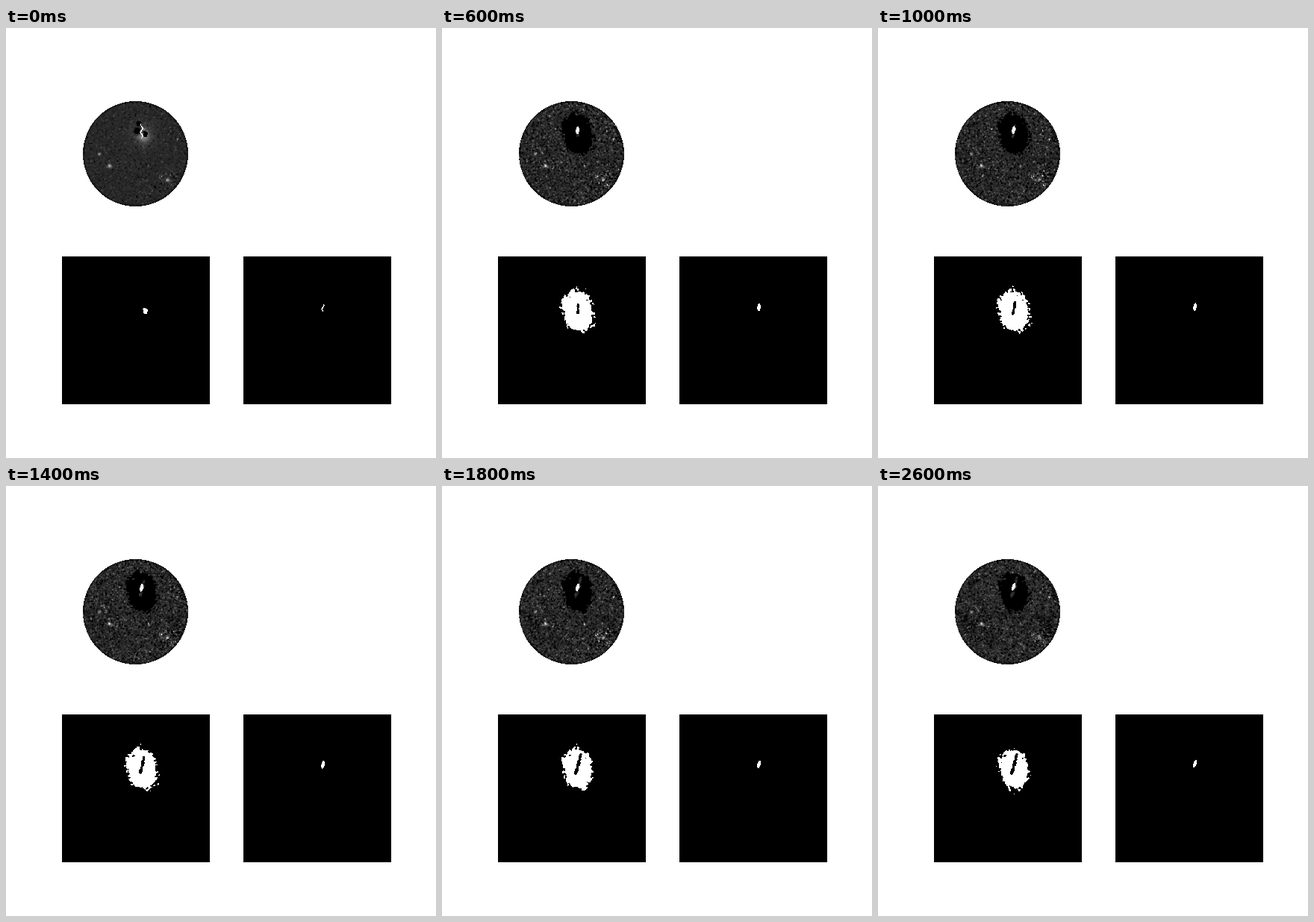
These frames come from a looping animation (576x576 px, 2800 ms). A matplotlib script:

```python
import numpy as np
import matplotlib.pyplot as plt
from matplotlib.animation import FuncAnimation

STAGE, PANEL, FRAMES = 576, 198, 14
axis = np.arange(PANEL) + 0.5
X, Y = np.meshgrid(axis, axis)
RADIUS = np.hypot(X - 98.5, Y - 99.5)


def noise(seed, passes=1):
    """Seeded grain; more passes make larger clumps."""
    n = np.random.default_rng(seed).standard_normal(X.shape)
    for _ in range(passes):
        for side in (0, 1):
            n = n + 0.35 * (np.roll(n, 1, side) + np.roll(n, -1, side))
    return n / n.std()


def glow(x, y, sigma):
    return np.exp(-((X - x) ** 2 + (Y - y) ** 2) / (2 * sigma ** 2))


def stroke(ax, ay, bx, by, width):
    """Signed distance to a thick line, positive inside."""
    dx, dy = bx - ax, by - ay
    t = np.clip(((X - ax) * dx + (Y - ay) * dy) / (dx * dx + dy * dy), 0, 1)
    return width - np.hypot(X - ax - t * dx, Y - ay - t * dy)


GRAIN, EDGE, PATCH = noise(3), noise(5, 3), noise(8, 12)
ACTIVE = 1 + 0.6 * glow(142, 134, 9) + 0.5 * glow(159, 72, 9)


def timing(k):
    """Progress through the loop and the fading onset of the eruption."""
    return k / (FRAMES - 1), np.exp(-2 * k)


def filament(k, half_height):
    """Narrow bright column that first wriggles, then leans over."""
    p, onset = timing(k)
    rise = 68.7 - 2.7 * p - Y
    centre = 106.6 + 0.3 * p * rise + 1.3 * onset * np.sin(0.6 * Y)
    width = (2.2 - 1.3 * onset) * np.sqrt(np.clip(1 - (rise / half_height) ** 2, 0, 1))
    return np.abs(X - centre) < width


def dimming(k):
    """Signed depth of the dark region: a tilted oval split by a slit."""
    p, onset = timing(k)
    size = 1 - 0.85 * onset - 0.09 * p
    tilt = np.radians(16)
    x, y = X - 107.5 - 3.5 * onset, Y - 73
    across = x * np.cos(tilt) - y * np.sin(tilt)
    along = x * np.sin(tilt) + y * np.cos(tilt)
    depth = 20 * (size - np.hypot(across / 21, along / 29))
    depth += size * (1.7 * EDGE + 0.9 * noise(100 + k, 2))

    if k >= 10:
        depth = np.maximum(depth, stroke(99, 94, 102, 111 - 3 * (k - 10), 1.3))

    opening = np.clip((k - 3) / 6, 0, 1)
    slit = stroke(107 + 4 * opening, 65 - 11 * opening,
                  107 - 3 * opening, 75 + 4 * opening, 1.5 + 0.4 * opening)
    return np.minimum(depth, 0.5 * EDGE - slit)


def disc(k, depth):
    p, onset = timing(k)
    mix = 0.35 + 0.2 * p
    grain = np.sqrt(1 - mix ** 2) * GRAIN + mix * noise(300 + k)
    grain = ACTIVE * grain
    img = 40 + (1 - 0.6 * onset) * (12 * grain + 2.2 * grain ** 3)
    img += 5 * p * PATCH - 18 * p * (glow(48, 118, 9) + glow(150, 117, 7))
    img += 130 * (glow(64, 116, 1.8) + glow(142, 135, 1.8) + glow(50, 100, 1.2))
    img -= 12 * (RADIUS > 68)

    # Darkening spreads softly past the region as the first glow fades
    img *= onset + (1 - onset) * np.clip(0.8 - depth / 6, 0, 1)
    img += onset * (75 * glow(110, 77, 5) + 30 * glow(108, 72, 11))
    img -= onset * 170 * (glow(101, 69, 2.6) + glow(103, 59, 1.8))
    img += onset * 230 * filament(k, 10)

    img[depth > 0] = 0
    img[filament(k, 5.3)] = 255
    img[RADIUS > 70.5] = 255
    return np.clip(img, 0, 255)


def scene(k):
    depth = dimming(k)
    return disc(k, depth), 255 * (depth > 0), 255 * filament(k, 5.3)


fig = plt.figure(figsize=(STAGE / 100, STAGE / 100), dpi=100, facecolor="white")


def panel(left, top, data):
    ax = fig.add_axes([left / STAGE, 1 - (top + PANEL) / STAGE,
                       PANEL / STAGE, PANEL / STAGE])
    ax.axis("off")
    return ax.imshow(data, cmap="gray", vmin=0, vmax=255,
                     interpolation="nearest", aspect="auto")


places = [(75, 69), (75, 306), (318, 306)]
images = [panel(*place, data) for place, data in zip(places, scene(0))]


def update(k):
    for image, data in zip(images, scene(k)):
        image.set_data(data)
    return images


anim = FuncAnimation(fig, update, frames=FRAMES, interval=200,
                     repeat=True, repeat_delay=0)
plt.show()
```
